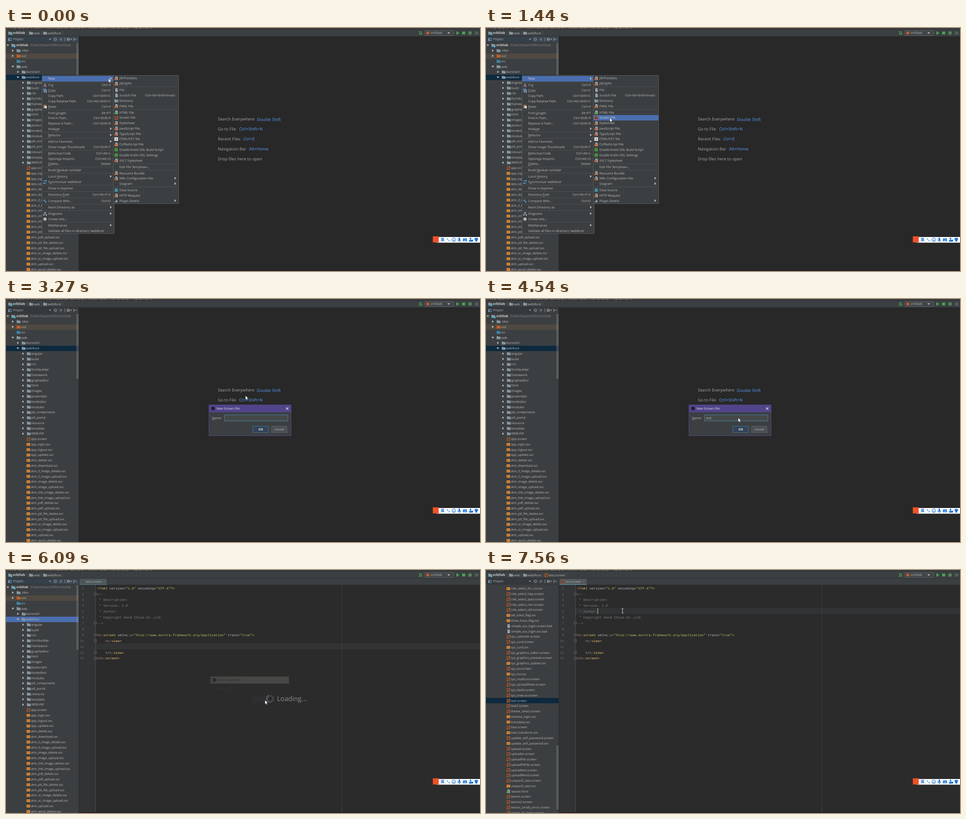
Animation of 1045 by 536 pixels, one loop 8 s. Source, as an HTML page with a canvas:

```html
<!DOCTYPE html>
<html lang="en">
<head>
<meta charset="utf-8">
<title>New screen file</title>
<style>
html, body { margin: 0; width: 100%; height: 100%; overflow: hidden; background: #282828; }
canvas { display: block; }
</style>
</head>
<body>
<canvas id="stage" width="1045" height="536"></canvas>
<script>
const c = document.getElementById('stage').getContext('2d');
const LOOP = 8000, PITCH = 11.77, PROJECT = 'orb5lab';
const SANS = '"Open Sans", "Noto Sans", sans-serif';
const MONO = '"Liberation Mono", "DejaVu Sans Mono", monospace';
const PANEL = '#3c3f41', TEXT = '#bbbbbb', SELECT = '#4b6eaf', ORANGE = '#e08a35', GREEN = '#4aa657';
const FOLDER = '#87979f', RUST = '#c7622f', STEEL = '#9aa7b0';

function box(x, y, w, h, fill, line) {
  if (fill) { c.fillStyle = fill; c.fillRect(x, y, w, h); }
  if (line) { c.strokeStyle = line; c.lineWidth = 1; c.strokeRect(x + .5, y + .5, w - 1, h - 1); }
}
function text(s, x, y, size = 7, color = TEXT, opt = {}) {
  c.font = `${opt.weight || 400} ${size}px ${opt.font || SANS}`;
  c.textAlign = opt.align || 'left';
  c.fillStyle = color;
  c.fillText(s, x, y + size * .35);
}
function line(points, color, width = 1) {
  c.strokeStyle = color; c.lineWidth = width;
  c.beginPath();
  points.forEach(([x, y]) => c.lineTo(x, y));
  c.stroke();
}
function poly(points, color) {
  c.fillStyle = color;
  c.beginPath();
  points.forEach(([x, y]) => c.lineTo(x, y));
  c.fill();
}
function disc(x, y, r, fill, stroke, width = 1) {
  c.beginPath(); c.arc(x, y, r, 0, 7);
  if (fill) { c.fillStyle = fill; c.fill(); }
  if (stroke) { c.strokeStyle = stroke; c.lineWidth = width; c.stroke(); }
}
const right = (x, y, col = TEXT) => poly([[x - 1.5, y - 3], [x + 2.2, y], [x - 1.5, y + 3]], col);
const down = (x, y, col = TEXT, r = 3) => poly([[x - r, y - r / 2], [x + r, y - r / 2], [x, y + r * .7]], col);

// Icons are centred on x, y
const icon = {
  folder(x, y, col = FOLDER) { box(x - 4, y - 3, 4, 2, col); box(x - 4, y - 2, 8.5, 5.5, col); },
  module(x, y) { icon.folder(x, y); box(x + 1, y + 1, 4, 3.5, '#40b6e0'); },
  screen(x, y) {
    box(x - 3.5, y - 3.5, 7.5, 7.5, '#46352e', RUST);
    line([[x - 2, y + 2.5], [x + 3, y - 2.5]], '#d9a07c', .9);
  },
  svc(x, y) {
    box(x - 4, y - 2.8, 8, 6, ORANGE);
    for (let i = -1; i < 2; i++) box(x - .5 + i * 2, y - .3, 1.1, 1.1, '#6b4420');
  },
  page(x, y, tag) {
    poly([[x - 2, y - 4], [x + 2, y - 4], [x + 3.5, y - 2.3], [x + 3.5, y + 4], [x - 2, y + 4]], STEEL);
    line([[x - .5, y - 1], [x + 2.5, y - 1]], '#55606a', .8);
    if (tag) box(x - 4, y, 5.5, 4, tag);
  },
  rust(x, y) { icon.page(x, y, RUST); },
  file(x, y) { icon.page(x, y); },
  html(x, y) { icon.page(x, y, '#5b9a50'); },
  green(x, y) { disc(x, y, 3.6, '#3f8b3a', '#5fae4f', .8); },
  data(x, y) { for (let i = -1; i < 2; i++) box(x - 3.5, y - 1 + i * 2.6, 7, 2, '#4b9fc4'); },
  white(x, y) { box(x - 4, y - 4, 8, 8, '#e6e6e6'); disc(x, y, 1.7, null, '#555', .9); },
  plug(x, y) { disc(x + .5, y + 1, 2.3, STEEL); line([[x - 4, y + 4], [x + 3.5, y - 3]], STEEL); },
  cut(x, y) {
    line([[x - 2.5, y - 4], [x + 1.5, y + 1.5]], TEXT); line([[x + 2.5, y - 4], [x - 1.5, y + 1.5]], TEXT);
    disc(x - 2, y + 2.5, 1.4, null, '#a77ac0'); disc(x + 2, y + 2.5, 1.4, null, '#a77ac0');
  },
  copy(x, y) { box(x - 4, y - 4, 5.5, 6.5, PANEL, '#7fa8cc'); box(x - 1.5, y - 2, 5.5, 6.5, '#4d6b85', '#8fb9dc'); },
  paste(x, y) { box(x - 3.5, y - 3.5, 6, 7.5, '#b87d4a'); box(x - .5, y - 1, 4.5, 5, '#d8d8d8'); },
  sync(x, y) {
    c.strokeStyle = '#46a9dd'; c.lineWidth = 1.3;
    for (const a of [.2, 3.35]) { c.beginPath(); c.arc(x, y, 3, a, a + 2.4); c.stroke(); }
    box(x + 1.5, y - 4, 2.4, 2.4, '#46a9dd'); box(x - 3.7, y + 1.7, 2.4, 2.4, '#46a9dd');
  },
  compare(x, y) {
    poly([[x - 4, y - 1.5], [x - .5, y - 4], [x - .5, y + 1]], '#46a9dd');
    poly([[x + 4, y + 1.5], [x + .5, y - 1], [x + .5, y + 4]], '#46a9dd');
  },
  graph(x, y) {
    box(x - 1.3, y - 4, 3, 3, STEEL); box(x - 4, y + 1, 3, 3, STEEL); box(x + 1.3, y + 1, 3, 3, STEEL);
    line([[x - 2.5, y + 1], [x - 2.5, y], [x + 2.8, y], [x + 2.8, y + 1]], STEEL, .8);
  },
  gist(x, y) { disc(x, y, 3.6, '#b5b5b5'); }
};

// Menu rows: icon|label|shortcut, ">" opens a submenu, "-" is a separator, "&" underlines
const mainMenu = `|New|>
-
cut|Cu&t|Ctrl+X
copy|&Copy|Ctrl+C
|Copy Path|Ctrl+Shift+C
|Copy Relative Path|Ctrl+Alt+Shift+C
paste|&Paste|Ctrl+V
-
|Find &Usages|Alt+F7
|Find in Path...|Ctrl+Shift+F
|Replace in Path...|Ctrl+Shift+R
|Analy&ze|>
-
|&Refactor|>
-
|Add to Favorites|>
|Show Image Thumbnails|Ctrl+Shift+T
-
|&Reformat Code|Ctrl+Alt+L
|Optimi&ze Imports|Ctrl+Alt+O
|&Delete...|Delete
-
|Build &Module '${PROJECT}'|
-
|Local &History|>
sync|S&ynchronize 'webRoot'|
-
|Show in Explorer|
-
|Directory &Path|Ctrl+Alt+F12
-
compare|Compare With...|Ctrl+D
-
|Mark Directory as|>
-
graph|Diagrams|>
gist|Create Gist...|
-
|WebServices|>
|Validate all files in directory 'webRoot'|`.split('\n');
const newMenu = `rust|JSF/Facelets|
rust|JSP/JSPX|
-
file|File|
file|Scratch File|Ctrl+Alt+Shift+Insert
folder|Directory|
rust|FXML File|
-
html|HTML File|
screen|Screen File|
rust|Stylesheet|
rust|JavaScript File|
rust|TypeScript File|
white|CFML/CFC file|
rust|CoffeeScript File|
green|Gradle Kotlin DSL Build Script|
green|Gradle Kotlin DSL Settings|
rust|XSLT Stylesheet|
-
|Edit File Templates...|
-
rust|Resource Bundle|
rust|XML Configuration File|>
|Diagram|>
-
data|Data Source|
rust|HTTP Request|
plug|Plugin DevKit|>`.split('\n');

function menu(rows, x, w, h, first, mouse) {
  box(x - 1, 104, w + 2, h, PANEL, '#55585a');
  let y = first;
  for (const row of rows) {
    if (row === '-') {
      box(x + 1, Math.round(y - 5.2), w - 2, 1, '#4d5052');
      y += 2.25;
      continue;
    }
    const [kind, label, key] = row.split('|');
    const hot = label === 'New' || mouse && mouse[0] > x + 1 && Math.abs(mouse[1] - y) <= 5.9;
    const col = hot ? '#d2d6de' : TEXT, tx = x + 13;
    if (hot) box(x, Math.round(y - 6), w, 12, SELECT);
    if (kind) icon[kind](x + 6, y);
    const cut = label.indexOf('&'), plain = label.replace('&', '');
    text(plain, tx, y, 7.08, col);
    if (cut >= 0) {
      const a = c.measureText(plain.slice(0, cut)).width, b = c.measureText(plain[cut]).width;
      box(tx + a, y + 3.5, b, .7, col);
    }
    if (key === '>') right(x + w - 7, y - .5);
    else if (key) text(key, x + w - 7, y, 7.08, col, { align: 'right' });
    y += PITCH;
  }
}

const dirs = 'angular build css formbuilder framework grapheditor html images javascripts kindeditor modules ptl_components ptl_portal resource template WEB-INF'.split(' ');
const files = ('app.screen app_login.svc app_logout.svc app_update.svc atm_delete.svc atm_download.svc atm_il_image_delete.svc ' +
  'atm_il_image_upload.svc atm_image_delete.svc atm_image_upload.svc atm_link_image_delete.svc atm_link_image_upload.svc ' +
  'atm_pdf_delete.svc atm_pdf_upload.svc atm_ptl_file_delete.svc atm_ptl_file_upload.svc atm_sc_image_delete.svc ' +
  'atm_sc_image_upload.svc atm_upload.svc atm_word_delete.svc').split(' ');
const lowFiles = ('role_select_for_ios.svc role_select_hap.screen role_select_ipad.screen role_select_min.screen role_select_old.screen ' +
  'set_trace_flag.svc show_trace_flag.svc simple_sso_login.screen.bak simple_sso_login.svc.bak sys_calendar.screen sys_curd.screen ' +
  'sys_curd.svc sys_graphics_editor.screen sys_graphics_preview.screen sys_graphics_update.svc sys_lov.screen sys_lov.svc ' +
  'sys_multiLov.screen sys_spreadSheet.screen sys_tledit.screen sys_treeLov.screen test.screen test2.screen theme_select.screen ' +
  'timeout_login.svc transdata.svc tree.screen tree_transform.svc update_self_password.screen update_self_passwrod.svc ' +
  'upload.screen uploader.screen uploadFile.screen uploadPtlFile.screen uploadtest.screen uploadWord.screen ureport2_test.screen ' +
  'ureport2_test.svc weixin.html weixin.screen weixin2.screen weixin_certify_error.screen weixin_qv_login.screen').split(' ');

function dirRow(name, depth, y, open, arrow = true, col = FOLDER) {
  const x = 15 + (depth - 1) * 11.3;
  if (arrow) open ? down(x, y) : right(x, y);
  icon.folder(x + 12.5, y, col);
  text(name, x + 18.5, y, 6.95);
}
function fileRow(name, y) {
  const ext = name.split('.').pop();
  icon[ext === 'bak' ? 'file' : ext](49.3, y);
  text(name, ext === 'bak' || ext === 'html' ? 56 : 55, y, 6.87);
}
function tree(scrolled, focused) {
  c.save();
  c.beginPath(); c.rect(0, 32, 160, 504); c.clip();
  box(0, 32, 160, 504, PANEL);
  if (scrolled) {
    box(0, 282, 160, 12, '#0d293e');
    lowFiles.forEach((f, i) => fileRow(f, 41 + i * PITCH));
    box(155, 387, 5, 141, 'rgba(150,150,150,.33)');
  } else {
    const at = i => 38 + i * PITCH;
    box(0, Math.round(at(2) - 6), 160, 12, '#4f4941');
    box(0, Math.round(at(6) - 6), 160, 12, focused ? SELECT : '#0d293e');
    down(4, at(0)); icon.module(16, at(0));
    text(PROJECT, 22.5, at(0), 6.95, '#d0d0d0', { weight: 700 });
    text('D:\\workspace\\IDEA\\' + PROJECT, 54, at(0), 6.95, '#85888a');
    dirRow('.idea', 1, at(1));
    dirRow('out', 1, at(2), false, true, '#c2612c');
    dirRow('src', 1, at(3), false, false, '#3f87a8');
    dirRow('web', 1, at(4), true);
    dirRow('AuroraUI', 2, at(5));
    dirRow('webRoot', 2, at(6), true);
    dirs.forEach((d, i) => dirRow(d, 3, at(7 + i)));
    files.forEach((f, i) => fileRow(f, at(23 + i)));
    box(155, 33, 5, 143, 'rgba(150,150,150,.33)');
  }
  c.restore();
}

function chevron(x) { line([[x, 6], [x + 2, 11], [x, 16]], '#55585a', .9); }
function topBars(opened, active) {
  box(0, 0, 1045, 19, PANEL);
  c.save();
  c.beginPath(); c.rect(0, 0, 326, 1); c.clip();
  text('File Edit View Navigate Code Analyze Refactor (Build).', 2, -4, 13, '#a8a8a8');
  c.restore();
  box(0, 2, 1045, 1, '#2c2e2f');
  box(0, 18, 1045, 1, '#2e3032');
  icon.module(9, 11); text(PROJECT, 15, 11, 7.1, '#d0d0d0', { weight: 700 }); chevron(46);
  icon.folder(55, 11); text('web', 61, 11, 7.15); chevron(77);
  icon.folder(86, 11); text('webRoot', 92, 11, 7.15); chevron(124);
  if (opened) { icon.screen(132.5, 11); text('test.screen', 138, 11, 7.15); chevron(176); }

  for (let i = 0; i < 3; i++) box(911, 7 + i * 3, 3, 2, GREEN);
  line([[916.5, 7], [916.5, 14]], GREEN); down(916.7, 13.5, GREEN, 2);
  box(923, 5, 64, 12, '#414547', '#5c6062');
  disc(930, 11, 3.3, '#cf5a32');
  text(PROJECT, 936, 11, 7.05); down(976, 11);
  poly([[993, 7], [999.5, 11], [993, 15]], GREEN);
  disc(1009, 11, 3.3, GREEN); line([[1005, 8], [1013, 14]], GREEN); line([[1013, 8], [1005, 14]], GREEN);
  disc(1023, 11, 3.4, '#4d6654', GREEN); poly([[1022, 8.8], [1026, 11], [1022, 13.2]], GREEN);
  box(1034, 7.5, 7, 7, '#595c5e');

  box(0, 19, 160, 13, active ? '#3d4854' : PANEL);
  box(0, 19, 102, 12, active ? '#35404b' : '#34393e');
  box(0, 31, 160, 1, '#333638');
  box(5, 22, 7, 6.5, null, '#7fa0b8'); box(6, 24, 2, 4, '#7fa0b8');
  text('Project', 16, 25, 6.9);
  down(97, 25, TEXT, 2.3);
  disc(109, 25, 2.8, null, '#9a9da0'); disc(109, 25, .8, '#9a9da0');
  line([[118, 25], [124, 25]], '#9a9da0'); line([[121, 21.5], [121, 24]], '#9a9da0'); line([[121, 26], [121, 28.5]], '#9a9da0');
  box(129.5, 21, 1, 8, '#8b8e90');
  disc(137.5, 25, 2.2, null, '#a0a3a5', 1.6); down(143.5, 25, TEXT, 1.8);
  line([[149.5, 21.5], [149.5, 28.5]], '#a0a3a5'); line([[150, 25], [156, 25]], '#a0a3a5');
}

function welcome() {
  box(161, 19, 884, 517, '#282828');
  [['Search Everywhere', 'Double Shift', 553], ['Go to File', 'Ctrl+Shift+N', 514], ['Recent Files', 'Ctrl+E', 523],
    ['Navigation Bar', 'Alt+Home', 536], ['Drop files here to open', '', 0]].forEach(([name, key, x], i) => {
    const y = 201.3 + i * 21.9;
    text(name, 467, y, 9.12, '#a6a6a6');
    text(key, x, y, 9.2, '#589df6');
  });
}

// Code lines: colour key then text, in pairs
const ink = { t: '#e8bf6a', a: '#bababa', v: '#a5c261', n: '#9876aa', c: '#808080' };
const code = [
  ['t', '<?', 't', 'xml ', 'a', 'version=', 'v', '"1.0"', 'a', ' encoding=', 'v', '"UTF-8"', 't', '?>'],
  ['c', '<!--'], ['c', ' * Description:'], ['c', ' * Version: 1.0'], ['c', ' * Author:'],
  ['c', ' * Copyright Hand China Co.,Ltd.'], ['c', '-->'], [],
  ['t', '<', 'n', 'a:', 't', 'screen ', 'a', 'xmlns', 'n', ':a', 'v', '="http://www.aurora-framework.org/application"',
    'a', ' trace=', 'v', '"true"', 't', '>'],
  ['t', '    <', 'n', 'a:', 't', 'view>'], [], ['t', '    </', 'n', 'a:', 't', 'view>'], ['t', '</', 'n', 'a:', 't', 'screen>']
];
const lineY = n => 40 + (n - 1) * 12.9;

function editor(ready, row, caret) {
  const rowTop = Math.floor(lineY(row) - 7);
  box(161, 19, 884, 13, PANEL);
  box(161, 32, 884, 504, '#2b2b2b');
  box(161, 32, 36, 504, '#313335');
  box(161, rowTop, 884, 13, '#323334');
  box(161, 32, 884, 1, '#323536');
  box(162, 19, 60, 13, ready ? '#4e5658' : '#4b5658');
  box(162, 31, 60, 1.5, ready ? '#6b8fa3' : '#5f7a82');
  if (ready) icon.screen(169.5, 25.5);
  text('test.screen', ready ? 175 : 176, 25.5, 6.95);
  const x = ready ? 215.5 : 216.5;
  line([[x - 1.5, 24], [x + 1.5, 27]], '#8a8d8f', .8); line([[x + 1.5, 24], [x - 1.5, 27]], '#8a8d8f', .8);
  box(197, 32, 1, 504, '#505254');
  box(740, 32, 1, 504, '#404142');
  code.forEach((parts, i) => {
    const y = lineY(i + 1);
    text(i + 1, 172, y, 7.5, '#676a6d', { font: MONO, align: 'right' });
    let col = 0;
    for (let k = 0; k < parts.length; k += 2) {
      text(parts[k + 1], 201 + col * 4.5, y, 7.5, ink[parts[k]], { font: MONO });
      col += parts[k + 1].length;
    }
    if ([2, 7, 9, 10, 12, 13].includes(i + 1)) {
      box(194, Math.round(y) - 3, 6, 6, '#2f3133', '#56595b');
      box(195.5, Math.round(y) - .4, 3, .8, '#74777a');
    }
  });
  if (caret) box(row === 5 ? 246 : 237, rowTop, 1, 13, '#d0d0d0');
}

function loading(t) {
  for (let i = 0; i < 12; i++) {
    const a = i * Math.PI / 6, dx = Math.cos(a), dy = Math.sin(a), g = 75 + (i + Math.floor(t / 70)) % 12 * 5;
    line([[582 + dx * 5, 284 + dy * 5], [582 + dx * 9.3, 284 + dy * 9.3]], `rgb(${g},${g},${g})`, 1.7);
  }
  text('Loading...', 597.5, 284, 14.6, '#8c8c8c');
}
function ghost() {
  box(451, 235, 173, 15.5, '#474745');
  box(455.5, 238.5, 8, 8, '#2c2c2c');
  text('New Screen File', 466.5, 243, 6.8, '#303030', { weight: 600 });
  text('Name:', 458, 262, 6.7, '#373737');
  text('test', 486, 262, 6.7, '#3c3c3c');
  box(483, 268, 134, 1, '#303030');
  box(543, 279, 33, 14, '#2d2f32');
}

function dialog(name, caret, okFocus) {
  box(447, 233, 182, 69, PANEL, '#57478f');
  box(447, 233, 182, 17, '#52448a');
  box(453, 238, 7, 7, '#1e1e22');
  text('New Screen File', 464, 242, 7, '#e2e0ea');
  line([[617.3, 239], [622.7, 244.4]], '#e0e0e8', 1.1); line([[622.7, 239], [617.3, 244.4]], '#e0e0e8', 1.1);
  text('Name:', 454, 262.3, 7);
  box(454.5, 266, 5, .8, TEXT);
  box(481, 255, 141, 14.5, '#45494a', okFocus ? '#646869' : '#4b7fa0');
  text(name, 485, 262.3, 7);
  if (caret) box(485 + c.measureText(name).width, 257, 1, 10, '#cccccc');
  box(544, 280, 35, 15, '#365071', okFocus ? '#5c92c9' : '#4c708c');
  box(545, 281, 33, 13, okFocus ? '#35485f' : '#30435a', okFocus ? '#456c96' : null);
  text('OK', 561.7, 287.5, 7, '#dddddd', { weight: 700, align: 'center' });
  box(585, 280, 35, 15, '#4b4f51', '#5e6163');
  text('Cancel', 602.5, 287.5, 7, TEXT, { align: 'center' });
}

function imeBar() {
  const blue = '#1f73d2';
  box(949, 461, 96, 12.5, '#ffffff');
  box(941, 459.5, 13, 13.5, '#ee5126');
  text('英', 958, 467.3, 8.8, blue, { font: '"Noto Sans CJK SC", "Noto Sans CJK", sans-serif', weight: 700 });
  disc(973.3, 465.5, 1.2, blue); line([[976.5, 467], [977.3, 469], [976, 470.3]], blue, 1.2);
  disc(987.3, 467, 4, null, blue, 1.1); disc(985.8, 466, .7, blue); disc(988.8, 466, .7, blue);
  c.beginPath(); c.arc(987.3, 467.3, 2, .3, 2.84); c.stroke();
  box(997.7, 462.5, 3.4, 6, blue); line([[996, 466], [996.5, 469.5], [1002.3, 469.5], [1002.8, 466]], blue);
  line([[999.4, 469.5], [999.4, 472]], blue);
  box(1007.3, 464, 9, 6.5, blue);
  for (let i = 0; i < 6; i++) box(1008.6 + i % 3 * 2.5, 465.3 + Math.floor(i / 3) * 1.7, 1.2, .8, '#fff');
  box(1009.5, 468.7, 4.6, .8, '#fff');
  disc(1024, 464.4, 2, blue); box(1021, 467.3, 5, 4, blue); box(1026, 467, 3.8, 4, blue);
  poly([[1032.5, 464.5], [1035, 463], [1038.5, 463], [1041, 464.5], [1040.3, 467.5], [1039, 467], [1039, 471],
    [1034.7, 471], [1034.7, 467], [1033.2, 467.5]], blue);
}

// Pointer stops: time, x, y
const stops = [
  [0, 226, 111], [150, 229, 111], [290, 237, 112], [430, 248, 114], [580, 253, 121], [720, 257, 133], [870, 262, 148],
  [1010, 266, 166], [1160, 270, 186], [1290, 272, 194], [1440, 273, 198], [1860, 290, 200], [2010, 345, 206],
  [2150, 425, 211], [2300, 497, 213], [2440, 528, 213], [4130, 530, 217], [4270, 541, 236], [4410, 556, 262],
  [4550, 569, 291], [4690, 571, 287], [6440, 540, 265], [6580, 440, 190], [6720, 340, 116], [6870, 300, 93], [7280, 301, 90]
];
const pointer = t => stops.filter(s => s[0] <= t).pop().slice(1);

function drawPointer([x, y], beam) {
  if (beam) {
    line([[x, y - 4.5], [x, y + 4.5]], '#d8d8d8', 1);
    line([[x - 2, y - 5], [x + 2, y - 5]], '#d8d8d8', .9); line([[x - 2, y + 5], [x + 2, y + 5]], '#d8d8d8', .9);
    return;
  }
  const shape = [[0, 0], [0, 9], [2, 7.2], [3.4, 10.3], [4.9, 9.6], [3.6, 6.6], [6.2, 6.4], [0, 0]].map(p => [x + p[0], y + p[1]]);
  poly(shape, '#ffffff');
  line(shape, '#222222', .5);
}

const within = (t, a, b) => t >= a && t < b;
function draw(t) {
  const mouse = pointer(t), open = t >= 6090, ready = t >= 6440;
  c.textRendering = 'geometricPrecision';
  box(0, 0, 1045, 536, PANEL);
  topBars(ready, t < 1860 || within(t, 5970, 6440));
  tree(ready, within(t, 5970, 6440));
  if (open) editor(ready, t < 7560 ? 11 : 5, within(t, 6720, 6870) || within(t, 7150, 7280) || t >= 7560);
  else welcome();
  box(160, 19, 1, 517, '#2a2c2d');
  box(161, 534, 884, 2, '#231e1f');
  if (t < 1720) {
    menu(mainMenu, 80, 158, 350, 112, null);
    menu(newMenu, 237, 143, 284, 111, mouse);
  }
  if (within(t, 2010, 6090)) {
    const typed = t < 3420 ? 0 : t < 3570 ? 2 : t < 3730 ? 3 : 4;
    const caret = within(t, 2840, 3270) || within(t, 3420, 4130) || within(t, 4550, 5130);
    c.globalAlpha = t < 2150 || t >= 5970 ? .5 : 1;
    dialog('test'.slice(0, typed), caret, t >= 5130);
    c.globalAlpha = 1;
  }
  if (within(t, 6090, 6300)) { ghost(); loading(t); }
  imeBar();
  drawPointer(mouse, t >= 6300);
}

function frame(now) {
  draw(now % LOOP);
  requestAnimationFrame(frame);
}
requestAnimationFrame(frame);
</script>
</body>
</html>
```
